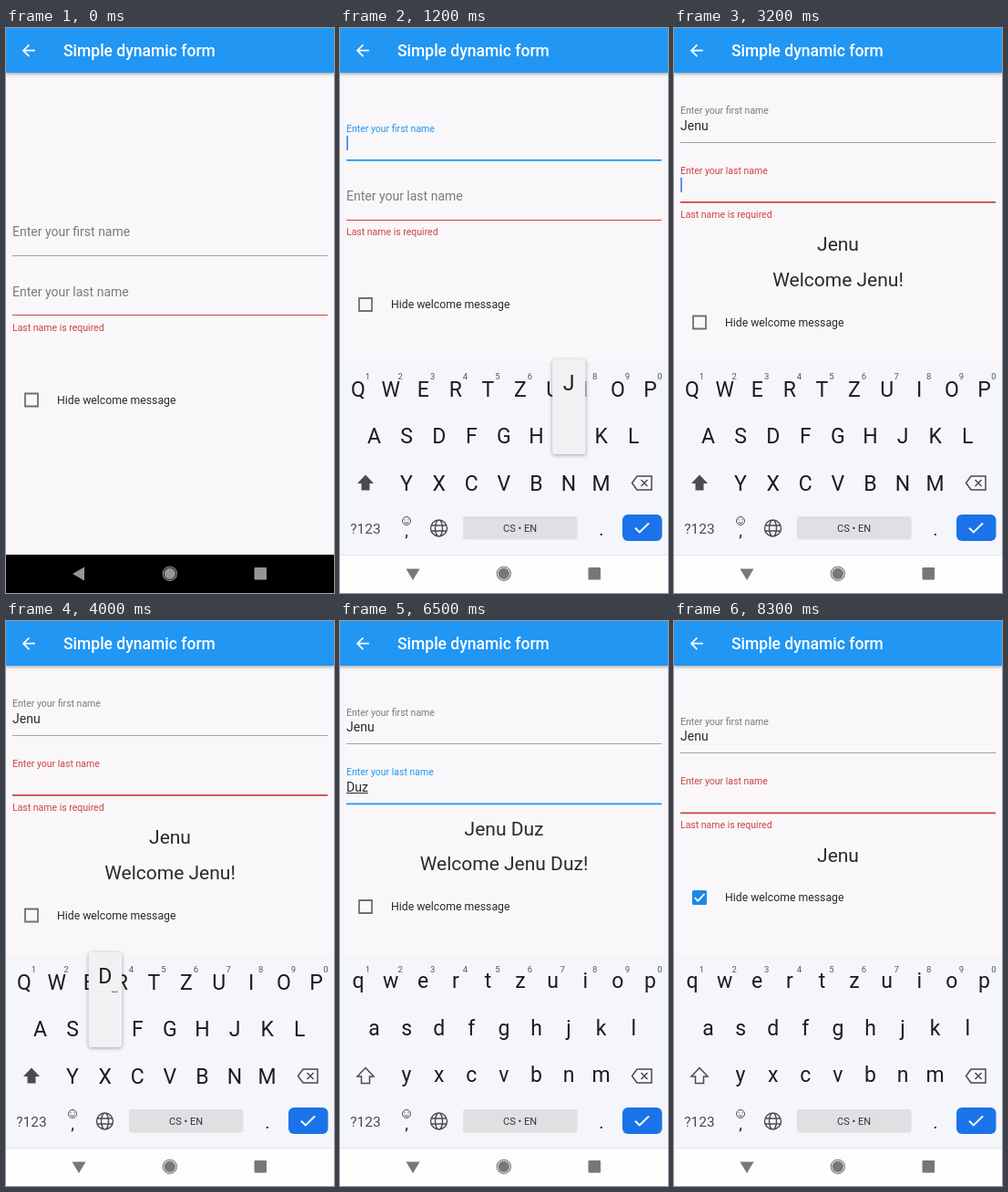
Recreate the animation shown at these times as an HTML page with a canvas. Size 360 px wide and 619 px high, loop 8700 ms.

```html
<!DOCTYPE html>
<html lang="en">
<head>
<meta charset="utf-8">
<title>Simple dynamic form</title>
<style>
html, body { margin: 0; width: 100%; height: 100%; overflow: hidden; background: #f9f7fa; }
canvas { display: block; width: 360px; height: 619px; }
</style>
</head>
<body>
<canvas id="stage" width="360" height="619"></canvas>
<script>
const ctx = document.getElementById('stage').getContext('2d');
const LOOP = 8700;
const BLUE = '#2196f3', RED = '#cc4444', GREY = '#7b7b7b', DARK = '#2a2a2c';

const FIRST = 'Jenu', LAST = 'Duz';
const firstTyped = [1300, 1600, 2000, 2400];
const lastTyped = [4100, 4600, 5100];
const lastErased = [7500, 7700, 7800];
const FOCUS_FIRST = 100, FOCUS_LAST = 2800, HIDE = 6800;
const blinkStarts = [100, 900, ...firstTyped, 3050, 4100, 4600, 5000, ...lastErased];
const popups = [['J', 1100, 1300], ['E', 1500, 1600], ['N', 1800, 1950], ['U', 2200, 2350],
                ['D', 3900, 4100], ['U', 4400, 4600], ['Z', 4800, 5000]];
const erasePresses = [7200, 7400, 7600, 7750];

const keyRows = [
  { keys: 'QWERTZUIOP', x: 20, y: 395.5 },
  { keys: 'ASDFGHJKL', x: 37.5, y: 447 },
  { keys: 'YXCVBNM', x: 73, y: 498.5 },
];
const KEY_STEP = 35.6;

const clamp = v => Math.max(0, Math.min(1, v));
const ease = v => { v = clamp(v); return v * v * (3 - 2 * v); };
const lerp = (a, b, k) => a + (b - a) * k;
const count = (times, t) => times.filter(v => v <= t).length;
const within = (t, from, to) => t >= from && t < to;

function text(str, x, y, size, color, align = 'left', weight = 400) {
  ctx.font = `${weight} ${size}px Roboto, sans-serif`;
  ctx.textAlign = align;
  ctx.fillStyle = color;
  ctx.fillText(str, x, y);
}

function rect(x, y, w, h, color, r = 0) {
  ctx.fillStyle = color;
  ctx.beginPath();
  ctx.roundRect(x, y, w, h, r);
  ctx.fill();
}

function circle(x, y, r, color) {
  ctx.fillStyle = color;
  ctx.beginPath();
  ctx.arc(x, y, r, 0, 7);
  ctx.fill();
}

function icon(d, x, y, { fill, stroke, width = 1.6, scale = 1 }) {
  const path = new Path2D(d);
  ctx.save();
  ctx.translate(x, y);
  ctx.scale(scale, scale);
  if (fill) { ctx.fillStyle = fill; ctx.fill(path); }
  if (stroke) { ctx.strokeStyle = stroke; ctx.lineWidth = width; ctx.stroke(path); }
  ctx.restore();
}

function withShadow(blur, dy, color, draw) {
  ctx.save();
  ctx.shadowBlur = blur;
  ctx.shadowOffsetY = dy;
  ctx.shadowColor = color;
  draw();
  ctx.restore();
}

function appBar() {
  withShadow(4, 1, 'rgba(0,0,0,.4)', () => rect(0, -5, 360, 54, BLUE));
  icon('M20 11H7.83l5.59-5.59L12 4l-8 8 8 8 1.41-1.41L7.83 13H20v-2z', 14.3, 14.2,
       { fill: '#fff', scale: .875 });
  text('Simple dynamic form', 63, 31, 17.5, '#fff', 'left', 500);
}

// y is the position of the underline
function field(t, label, value, y, focusAt, focused, error) {
  const float = ease((t - focusAt) / 200);
  const accent = error ? RED : BLUE;
  text(label, 7, y - lerp(21.3, 31.4, float), lerp(14, 10.5, float), focused ? accent : GREY);
  text(value, 7, y - 14, 14, DARK);
  const width = ctx.measureText(value).width;
  if (focused) {
    if (value) rect(7, y - 12.5, width, 1, DARK);
    const blink = Math.max(...blinkStarts.filter(v => v <= t));
    if ((t - blink) % 1000 < 500 && float === 1) rect(7.2 + width, y - 27, 1.7, 16, '#4285f4');
    rect(7, y - 1, 346, 1.8, accent);
  } else {
    rect(7, Math.round(y - .6), 346, 1, error ? RED : '#a3a2a3');
  }
}

function checkbox(t, y) {
  const ripple = clamp((t - 6700) / 300);
  if (ripple > 0 && ripple < 1) {
    circle(28, y, lerp(8, 17, ripple), `rgba(33,150,243,${.2 * (1 - ripple)})`);
  }
  if (t >= HIDE) {
    rect(20, y - 8, 16, 16, '#1e88e5', 1.5);
    icon('M-5.2 .2L-1.8 3.6L5.4 -3.8', 28, y, { stroke: '#fff', width: 1.8 });
  } else {
    icon('M-7 -7H7V7H-7Z', 28, y, { stroke: '#707072', width: 1.8 });
  }
  text('Hide welcome message', 56, y + 4.4, 12.25, DARK);
}

function form(t) {
  const first = FIRST.slice(0, count(firstTyped, t));
  const last = LAST.slice(0, count(lastTyped, t) - count(lastErased, t));
  const full = [first, last].filter(Boolean).join(' ');
  const welcome = full && t < HIDE;
  const noError = last ? 19 : 0, noWelcome = welcome ? 0 : 39;
  const y = 125.5 + (noError + noWelcome) / 2 + (t < 500 ? 104.5 : 0);
  const onLast = t >= FOCUS_LAST;

  field(t, 'Enter your first name', first, y, FOCUS_FIRST, t >= FOCUS_FIRST && !onLast, false);
  field(t, 'Enter your last name', last, y + 65.5, FOCUS_LAST, onLast, !last);
  if (!last) {
    ctx.globalAlpha = t > 7800 ? clamp((t - 7800) / 170) : 1;
    text('Last name is required', 7, y + 82.3, 10.5, RED);
    ctx.globalAlpha = 1;
  }
  text(full, 180, y + 118.5 - noError, 21, DARK, 'center');
  if (welcome) text(`Welcome ${full}!`, 180, y + 157 - noError, 21, DARK, 'center');
  checkbox(t, y + 197 - noError - noWelcome);
}

function letterKeys(upper) {
  keyRows.forEach(({ keys, x, y }, row) => [...keys].forEach((key, i) => {
    const kx = x + i * KEY_STEP;
    text(upper ? key : key.toLowerCase(), kx, y + (upper ? 8 : 6.5), 23, '#1c1c1f', 'center');
    if (row === 0) text((i + 1) % 10, kx + 10.5, 384.5, 9.5, '#55565a', 'center');
  }));
}

function controlKeys(t, upper) {
  const ink = '#4a4b50';
  icon('M0 -9L9 .5H4.5V8H-4.5V.5H-9Z', 28, 498.5,
       upper ? { fill: ink } : { stroke: ink, width: 1.5 });

  const press = erasePresses.find(v => within(t, v, v + 100));
  if (press) rect(308, 478, 47, 40, '#dddde2', 5);
  icon('M-5 -7.5H11V7.5H-5L-10.5 0ZM-.5 -3.5L6.5 3.5M6.5 -3.5L-.5 3.5', 331, 498.5,
       { stroke: ink, width: 1.5 });

  text('?123', 28, 553.5, 15.5, ink, 'center');
  icon('M4.5 0A4.5 4.5 0 1 1 -4.5 0A4.5 4.5 0 1 1 4.5 0M-2.3 1A2.5 2.5 0 0 0 2.3 1M-2 -1.8V-.6M2 -1.8V-.6',
       73, 540, { stroke: ink, width: 1 });
  text(',', 73, 556.5, 19, DARK, 'center');
  icon('M9 0A9 9 0 1 1 -9 0A9 9 0 1 1 9 0M4 0A4 9 0 1 1 -4 0A4 9 0 1 1 4 0M-8.5 -3H8.5M-8.5 3H8.5',
       108.5, 548, { stroke: ink, width: 1.4 });
  rect(135, 535, 125.5, 25.5, '#e0dfe2', 3);
  text('CS • EN', 197.5, 552, 11, '#333438', 'center');
  text('.', 287, 556, 20, DARK, 'center');
  rect(310, 533, 43.5, 29, '#1a73e8', 6);
  icon('M-7.5 .3L-2.7 5L7.5 -5', 331.5, 547.5, { stroke: '#fff', width: 1.9 });
}

function popup(t, upper) {
  const active = popups.find(([, from, to]) => within(t, from, to));
  if (!active) return;
  const key = active[0];
  const row = keyRows.find(r => r.keys.includes(key));
  const x = row.x + row.keys.indexOf(key) * KEY_STEP;
  withShadow(4, 1, 'rgba(0,0,0,.35)', () => rect(x - 18, row.y - 84, 36.5, 104, '#f1f1f4', 3));
  text(upper ? key : key.toLowerCase(), x, row.y - 50, 23, '#1c1c1f', 'center');
  if (key !== 'J') text('…', x + 10.5, row.y - 40, 11, DARK, 'center', 500);
}

function keyboard(t) {
  const shown = ease((t - 400) / 350);
  if (!shown) return;
  const upper = t < firstTyped[0] || within(t, 3000, lastTyped[0]);
  ctx.save();
  ctx.translate(0, (1 - shown) * 209);
  rect(0, 367.5, 360, 1, '#eeedf1');
  rect(0, 368, 360, 251, '#f5f6fa');
  letterKeys(upper);
  controlKeys(t, upper);
  popup(t, upper);
  ctx.restore();
}

function navBar(t) {
  const open = t >= 400;
  const ink = open ? '#77777a' : '#959595';
  rect(0, 577, 360, 42, open ? '#fdfdfe' : '#000');
  if (open) rect(0, 577, 360, 1, '#e6e6ea');
  icon(open ? 'M-7.5 -5.5H7.5L0 7Z' : 'M6 -7.5V7.5L-7 0Z', 80, 598, { fill: ink });
  circle(179.8, 597.8, 6.2, ink);
  icon('M7.6 0A7.6 7.6 0 1 1 -7.6 0A7.6 7.6 0 1 1 7.6 0', 179.8, 597.8, { stroke: ink, width: 1.1 });
  rect(272.5, 591, 13.5, 13.5, ink, 1);
}

function frame(now) {
  const t = now % LOOP;
  rect(0, 0, 360, 619, '#f9f7fa');
  form(t);
  appBar();
  keyboard(t);
  navBar(t);
  requestAnimationFrame(frame);
}
requestAnimationFrame(frame);
</script>
</body>
</html>
```
